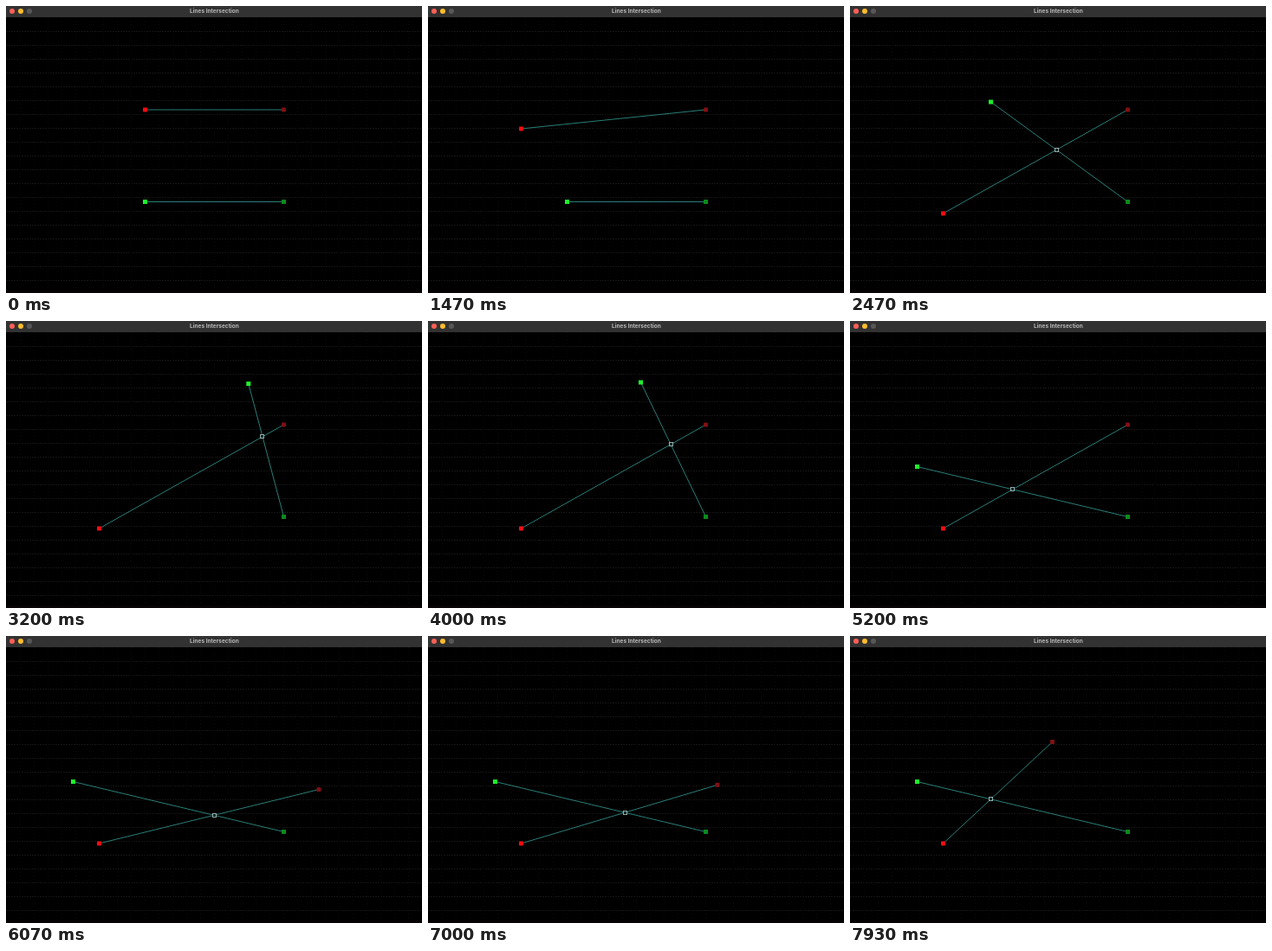
Recreate the animation shown at these times as an HTML page. Size 480 px wide and 332 px high, loop 8000 ms.

```html
<!DOCTYPE html>
<html lang="en">
<head>
<meta charset="utf-8">
<title>Lines Intersection</title>
<style>
html, body { margin: 0; width: 100%; height: 100%; overflow: hidden; background: #000; }
svg { display: block; }
text { font: 700 6.5px Inter, "Liberation Sans", sans-serif; fill: #b9b9b9; text-anchor: middle; }
</style>
</head>
<body>
<svg width="480" height="332" viewBox="0 0 480 332">
  <rect width="480" height="332" fill="#000"/>
  <g id="grid" fill="none"></g>
  <rect y="329" width="480" height="3" fill="#080406"/>
  <rect width="480" height="13" fill="#323232"/>
  <circle cx="7" cy="6" r="3" fill="#ff5f57"/>
  <circle cx="17" cy="6" r="3" fill="#febc2e"/>
  <circle cx="27" cy="6" r="3" fill="#575757"/>
  <text x="240.5" y="8.3">Lines Intersection</text>
  <g id="lines" stroke="#2a7f78"><line/><line/></g>
  <g id="dots">
    <rect width="5" height="5" rx="1" fill="#f80c12"/>
    <rect width="5" height="5" rx="1" fill="#801014"/>
    <rect width="5" height="5" fill="#1ef02c"/>
    <rect width="5" height="5" fill="#0d8a1c"/>
  </g>
  <rect id="cross" width="4" height="4" fill="#000" fill-opacity=".5" stroke="#93aeab"/>
</svg>
<script>
const LOOP = 8000, FPS = 15;
const $ = s => document.querySelector(s);
const set = (el, o) => { for (const k in o) el.setAttribute(k, o[k]); };

function gridLine(d, stroke, dash) {
  const p = document.createElementNS('http://www.w3.org/2000/svg', 'path');
  set(p, { d, stroke, 'stroke-dasharray': dash });
  $('#grid').append(p);
}
for (let y = 29.5; y < 329; y += 16) gridLine(`M0 ${y}H480`, '#141414', '2 1');
for (let x = 16.5; x < 480; x += 16) gridLine(`M${x} 13V329`, '#0a0a0a', '1 3');

const home = [[160.5, 120], [320.5, 120], [160.5, 226.5], [320.5, 226.5]];

// A drag carries one dot through evenly timed points, starting at `from`.
const drags = [
  { dot: 0, from: 270, gap: 600, path: [home[0], [83, 81]] },
  { dot: 0, from: 1070, gap: 400, path: [[83, 81], [107.5, 142], [16, 240], [107.5, 240]] },
  { dot: 2, from: 2470, gap: 382.5, path: [[162.5, 111], [216, 84], [284, 72], [297, 73],
    [245.5, 71], [184, 126], [53, 150], [77.5, 168.5]] },
  { dot: 1, from: 5330, gap: 740, path: [home[1], [361, 177.5]] },
  { dot: 1, from: 6200, gap: 435, path: [[361, 177.5], [351, 204], [333, 170]] },
  { dot: 1, from: 7200, gap: 730, path: [[333, 170], [233.5, 122.5]] }
];

// Smooth curve through the points, at rest at both ends.
function along(path, s) {
  const last = path.length - 1;
  if (s >= last) return path[last];
  const i = Math.floor(s), u = s - i, v = 1 - u;
  const slope = (j, c) => j > 0 && j < last ? (path[j + 1][c] - path[j - 1][c]) / 2 : 0;
  return [0, 1].map(c =>
    path[i][c] * (1 + 2 * u) * v * v + path[i + 1][c] * (1 + 2 * v) * u * u +
    u * v * (v * slope(i, c) - u * slope(i + 1, c)));
}

function place(dot, t) {
  const d = drags.filter(d => d.dot === dot && d.from <= t).pop();
  return d ? along(d.path, (t - d.from) / d.gap) : home[dot];
}

function meet([ax, ay], [bx, by], [cx, cy], [dx, dy]) {
  const rx = bx - ax, ry = by - ay, sx = dx - cx, sy = dy - cy;
  const det = rx * sy - ry * sx;
  if (Math.abs(det) < 1e-6) return null;
  const u = ((cx - ax) * sy - (cy - ay) * sx) / det;
  const v = ((cx - ax) * ry - (cy - ay) * rx) / det;
  return u >= 0 && u <= 1 && v >= 0 && v <= 1 ? [ax + u * rx, ay + u * ry] : null;
}

const lines = $('#lines').children, dots = $('#dots').children, cross = $('#cross');

function draw(ms) {
  const step = Math.floor(ms % LOOP * FPS / 1000 + 0.06);
  const t = Math.round(step * 100 / FPS) * 10;
  const pts = home.map((_, i) => place(i, t));
  pts.forEach(([x, y], i) => set(dots[i], { x: x - 2.5, y: y - 2.5 }));
  [0, 1].forEach(i => {
    const [a, b] = pts.slice(i * 2);
    set(lines[i], { x1: a[0], y1: a[1], x2: b[0], y2: b[1] });
  });
  const m = meet(...pts);
  cross.style.display = m ? '' : 'none';
  if (m) set(cross, { x: Math.floor(m[0]) - 1.5, y: Math.floor(m[1]) - 1.5 });
}

const start = performance.now();
function tick(now) {
  draw(Math.max(0, now - start));
  requestAnimationFrame(tick);
}
draw(0);
requestAnimationFrame(tick);
</script>
</body>
</html>
```
